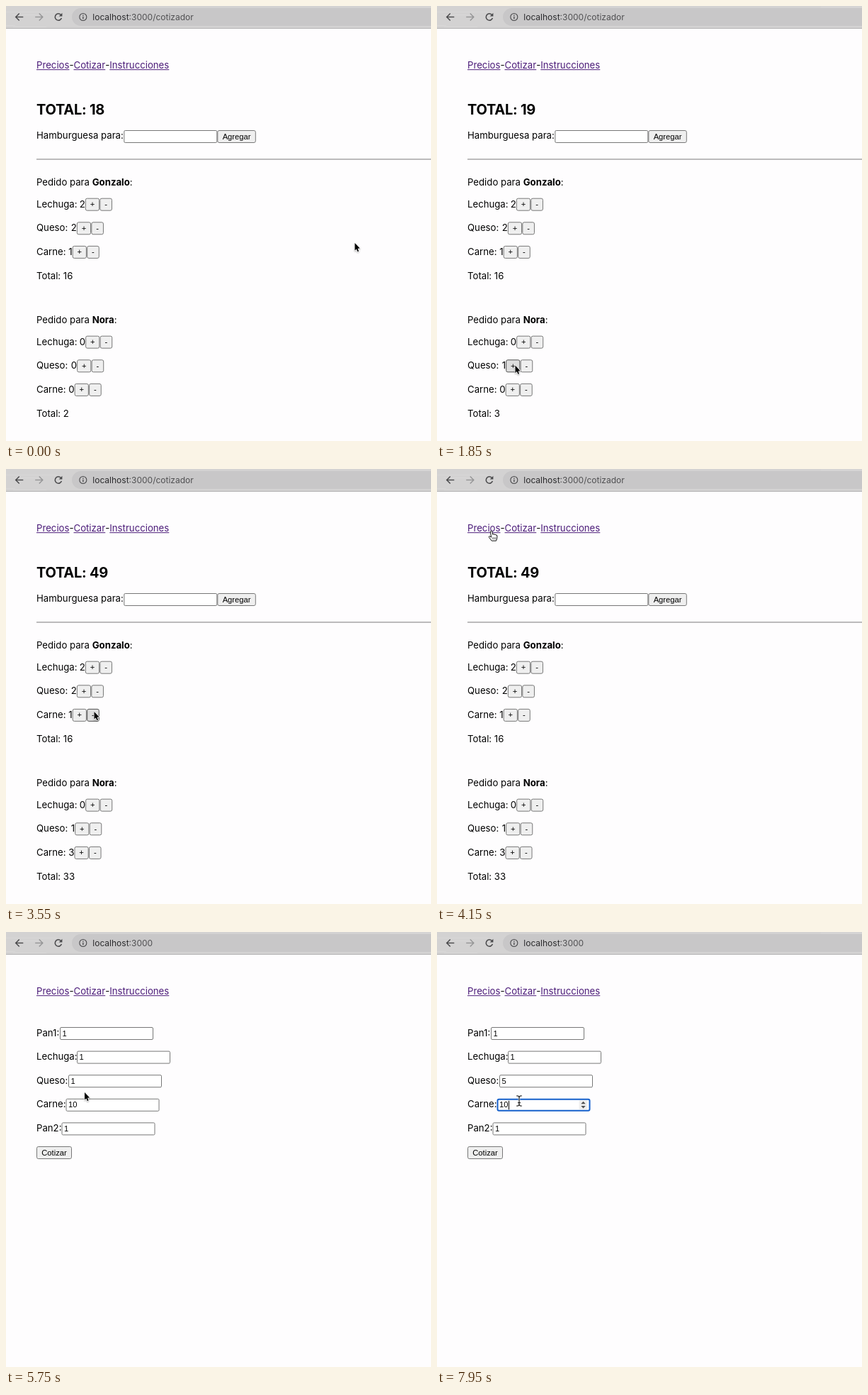
An HTML page with a canvas that plays this animation: 600 by 613 pixels, repeating every 8 s.

```html
<!DOCTYPE html>
<html lang="es">
<head>
<meta charset="utf-8">
<title>Cotizador</title>
<style>
html, body { margin: 0; width: 100%; height: 100%; overflow: hidden; background: #fefdfe; }
canvas { display: block; }
</style>
</head>
<body>
<canvas id="stage" width="600" height="613"></canvas>
<script>
const ctx = document.getElementById('stage').getContext('2d');
const LOOP = 8000;
const SANS = 'Inter, "Open Sans", sans-serif';
const BODY = '13.2px ' + SANS;
const BOLD = '700 13.2px ' + SANS;
const HEAD = '700 20px ' + SANS;
const BAR = '12px ' + SANS;
const FORM = '11.2px "Liberation Sans", Arial, sans-serif';
const LEFT = 43, ROW = 33.6, BOX_H = 18;

// Pointer moves: start, end, and where it arrives
const MOVES = [
  { from: 0, to: 850, x: 120.5, y: 504 },
  { from: 850, to: 1150, x: 110.5, y: 506.5 },
  { from: 1840, to: 2150, x: 108, y: 536.5 },
  { from: 3350, to: 3550, x: 124.5, y: 342 },
  { from: 3550, to: 4200, x: 76, y: 83 },
  { from: 5050, to: 5550, x: 112, y: 238 },
  { from: 5550, to: 5750, x: 111, y: 226 },
  { from: 5750, to: 5920, x: 123, y: 208 },
  { from: 7260, to: 7550, x: 116, y: 238 }
];
const ADDED = [1450, 2400, 2750, 3000];
const PAGE_AT = 4400, URL_AT = 4500;
const CLEAR_AT = 6700, TYPE_AT = 6950, CARNE_AT = 7650;

// Right edge of each label
const EDGE = { Pan1: 76, Lechuga: 100, Queso: 88, Carne: 84.5, Pan2: 78.5 };

let mouse, pressed, shape;

function pointer(t) {
  const pos = { x: 492.5, y: 334 };
  for (const m of MOVES) {
    const u = Math.min(1, Math.max(0, (t - m.from) / (m.to - m.from)));
    const k = u * u * (3 - 2 * u);
    pos.x += (m.x - pos.x) * k;
    pos.y += (m.y - pos.y) * k;
  }
  return pos;
}

const over = (x, y, w, h) => mouse.x >= x && mouse.x < x + w && mouse.y >= y && mouse.y < y + h;

function text(str, x, y, font = BODY, color = '#000') {
  ctx.font = font;
  ctx.fillStyle = color;
  ctx.fillText(str, x, Math.floor(y));
  return x + ctx.measureText(str).width;
}

function rect(color, x, y, w, h) {
  ctx.fillStyle = color;
  ctx.fillRect(x, y, w, h);
}

function box(x, y, w, r, fill, border, line = 1) {
  ctx.beginPath();
  ctx.roundRect(x + line / 2, y + line / 2, w - line, BOX_H - line, r);
  ctx.fillStyle = fill;
  ctx.fill();
  ctx.strokeStyle = border;
  ctx.lineWidth = line;
  ctx.stroke();
}

function stroke(color, width, ...pts) {
  ctx.beginPath();
  pts.forEach(([x, y]) => ctx.lineTo(x, y));
  ctx.strokeStyle = color;
  ctx.lineWidth = width;
  ctx.stroke();
}

function ring(color, width, x, y, r, a = 0, b = 7) {
  ctx.beginPath();
  ctx.arc(x, y, r, a, b);
  ctx.strokeStyle = color;
  ctx.lineWidth = width;
  ctx.stroke();
}

function poly(color, ...pts) {
  ctx.beginPath();
  pts.forEach(([x, y]) => ctx.lineTo(x, y));
  ctx.closePath();
  ctx.fillStyle = color;
  ctx.fill();
}

function button(label, x, y, w) {
  const hot = over(x, y, w, BOX_H);
  const fill = hot ? (pressed ? '#f5f5f5' : '#dedede') : '#efefef';
  box(x, y, w, 2.2, fill, hot ? '#505050' : '#777');
  ctx.textAlign = 'center';
  text(label, x + w / 2, y + 13, FORM);
  ctx.textAlign = 'left';
}

function spinner(cx, cy) {
  rect('#efefef', cx - 6, cy - 6.3, 12, 12.6);
  for (const s of [-1, 1]) {
    poly('#505050', [cx - 3.2, cy + s * 1.3], [cx, cy + s * 4.8], [cx + 3.2, cy + s * 1.3]);
  }
}

function input(x, y, value, focus, caret) {
  const hot = over(x, y, 132, BOX_H);
  if (hot) shape = 'beam';
  if (focus) box(x, y, 132, 2, '#fff', '#1660cb', 2);
  else box(x, y, 132, 1.5, '#fff', '#777');
  const end = text(value, x + 3.6, y + 13, FORM);
  if (caret) rect('#000', Math.round(end), y + 3, 1, 12.5);
  if (value !== null && (hot || focus)) spinner(x + 122, y + 8.8);
}

function arrowIcon(color, x, dir) {
  stroke(color, 1.4, [x - dir * 5.3, 15.5], [x + dir * 5, 15.5]);
  stroke(color, 1.4, [x + dir * .3, 10.5], [x + dir * 5.3, 15.5], [x + dir * .3, 20.5]);
}

function toolbar(t) {
  rect('#d3d2d2', 0, 0, 600, 31);
  let seed = 7;
  const rnd = () => (seed = seed * 16807 % 2147483647) / 2147483647;
  for (let i = 0; i < 30; i++) {
    rect('rgba(255,255,255,.1)', rnd() * 640 - 40, Math.floor(rnd() * 30), 30 + rnd() * 80, 1);
  }
  ctx.beginPath();
  ctx.roundRect(93, 3, 540, 25, 12.5);
  ctx.fillStyle = '#c8c7c8';
  ctx.fill();
  rect('#b2b1b2', 0, 31, 600, 1);

  const dark = '#48484a';
  arrowIcon(dark, 19, -1);
  arrowIcon('#959596', 46.5, 1);
  ring(dark, 1.5, 74, 15.5, 4.7, .35, 5.5);
  poly(dark, [79.4, 9.8], [79.4, 14.5], [74.7, 14.5]);
  ring(dark, 1.1, 108.8, 15.5, 5);
  rect(dark, 108.2, 14.8, 1.3, 3.5);
  rect(dark, 108.2, 12.5, 1.3, 1.3);

  const x = text('localhost', 122.3, 20, BAR, '#2b2b2d');
  text(t < URL_AT ? ':3000/cotizador' : ':3000', x, 20, BAR, '#505052');
}

function nav() {
  let x = LEFT;
  ['Precios', 'Cotizar', 'Instrucciones'].forEach((label, i) => {
    if (i) x = text('-', x, 88);
    const end = text(label, x, 88, BODY, '#4a1a78');
    rect('#4a1a78', x, 89.2, end - x, 1);
    if (over(x, 76, end - x, 16)) shape = 'hand';
    x = end;
  });
}

const price = ([lettuce, cheese, meat]) => 2 + lettuce + cheese + 10 * meat;

function order(name, counts, y) {
  const x = text('Pedido para ', LEFT, y + 5);
  text(':', text(name, x, y + 5, BOLD), y + 5);
  ['Lechuga', 'Queso', 'Carne'].forEach((item, i) => {
    const cy = y + 31.5 + i * ROW;
    text(item + ':', LEFT, cy + 4.5);
    const end = text(String(counts[i]), EDGE[item] + 3.8, cy + 4.5);
    button('+', end, cy - 8.8, 20.2);
    button('-', end + 20.5, cy - 8.8, 17.6);
  });
  text('Total: ' + price(counts), LEFT, y + 137);
}

function quotePage(t) {
  const added = ADDED.filter(a => t >= a).length;
  const first = [2, 2, 1];
  const second = [0, Math.min(added, 1), Math.max(added - 1, 0)];
  ctx.letterSpacing = '-0.25px';
  text('TOTAL: ' + (price(first) + price(second)), LEFT, 153, HEAD);
  ctx.letterSpacing = '0px';
  text('Hamburguesa para:', LEFT, 187);
  input(166.3, 175, null);
  button('Agregar', 298.3, 175, 54.5);
  rect('#9a999a', LEFT, 215.3, 557, 1.3);
  order('Gonzalo', first, 248);
  order('Nora', second, 442);
}

function pricePage(t) {
  const values = {
    Pan1: '1', Lechuga: '1', Carne: '10', Pan2: '1',
    Queso: t < CLEAR_AT ? '1' : t < TYPE_AT ? '' : '5'
  };
  const focus = t < 6000 ? '' : t < CARNE_AT ? 'Queso' : 'Carne';
  // The caret restarts its blink at each click or key
  const since = [6050, CLEAR_AT, TYPE_AT, CARNE_AT].filter(s => s <= t).pop();
  const caret = since !== undefined && (t - since) % 1000 < 500;
  Object.keys(EDGE).forEach((label, i) => {
    const y = 134 + i * ROW, active = focus === label;
    text(label + ':', LEFT, y + 13);
    input(EDGE[label], y, values[label], active, active && caret);
  });
  button('Cotizar', LEFT, 134 + 5 * ROW, 50);
}

function beam() {
  for (const [color, w] of [['rgba(255,255,255,.8)', 2.6], ['#222', 1.2]]) {
    for (const s of [-1, 1]) {
      stroke(color, w, [-3.8, s * 7.2], [-1.5, s * 7], [0, s * 5.5], [1.5, s * 7], [3.8, s * 7.2]);
    }
    stroke(color, w, [0, -5.5], [0, 5.5]);
    stroke(color, w, [-2, 2.6], [2, 2.6]);
  }
}

function hand() {
  const path = new Path2D('M-1.5 .7Q-.3-.9.9.7L1.9 5Q3.2 3.9 4.2 5.1Q5.6 4.5 6.2 5.8Q7.7 5.3 8.1 6.8L8 10.2L6.8 14H.4L-3.3 9.2Q-4.1 7.6-2.5 7.5L-.2 9Z');
  ctx.fillStyle = '#fff';
  ctx.fill(path);
  ctx.strokeStyle = '#111';
  ctx.lineWidth = 1;
  ctx.stroke(path);
  for (const x of [2, 4, 6]) stroke('#333', .8, [x, 9], [x, 12]);
}

function arrow() {
  const pts = [[0, 0], [0, 11.8], [2.6, 9.4], [4.4, 13.6], [6.3, 12.8], [4.6, 8.7], [8.1, 8.4]];
  ctx.scale(.88, .9);
  ctx.shadowColor = 'rgba(0,0,0,.3)';
  ctx.shadowBlur = 2;
  ctx.shadowOffsetY = 1;
  stroke('#fff', 1.8, ...pts, pts[0]);
  ctx.shadowColor = 'transparent';
  poly('#000', ...pts);
}

function cursor() {
  ctx.save();
  ctx.translate(mouse.x, mouse.y);
  ctx.lineJoin = 'round';
  ({ beam, hand, arrow })[shape]();
  ctx.restore();
}

function draw(t) {
  mouse = pointer(t);
  pressed = ADDED.some(a => t >= a - 150 && t < a);
  shape = 'arrow';
  rect('#fefdfe', 0, 0, 600, 613);
  toolbar(t);
  nav();
  if (t < PAGE_AT) quotePage(t);
  else pricePage(t);
  const typing = t >= CLEAR_AT && t < 7300;
  if (!typing) cursor();
}

// An empty field without a number passes null
const fill = ctx.fillText.bind(ctx);
ctx.fillText = (str, x, y) => { if (str !== null) fill(str, x, y); };

const start = performance.now();
function tick() {
  draw((performance.now() - start) % LOOP);
  requestAnimationFrame(tick);
}
tick();
</script>
</body>
</html>
```
